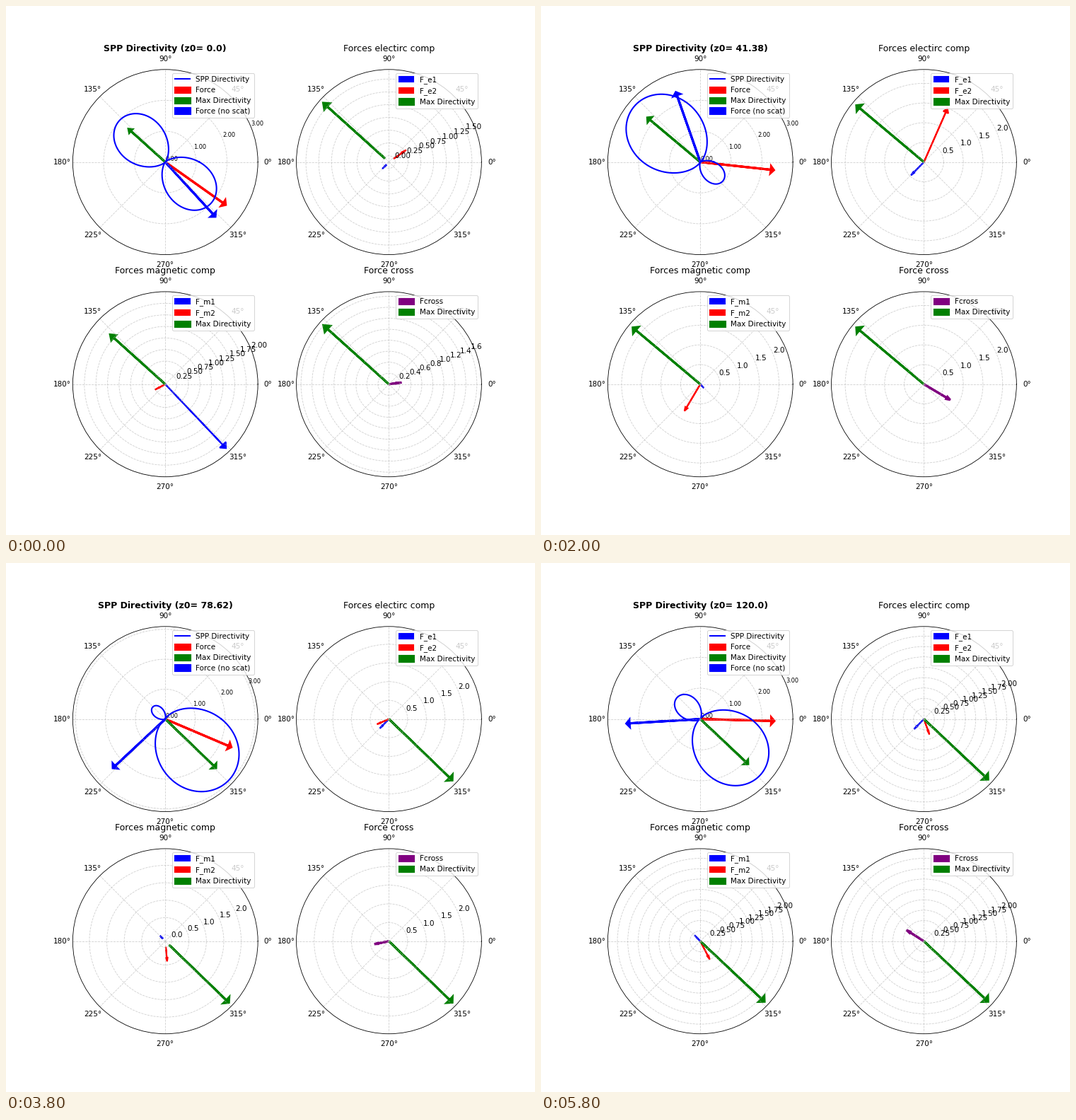
Write a matplotlib script that moves like this. It is 748 px wide and 748 px high and loops after 6000 ms.

```python
import numpy as np
import matplotlib.pyplot as plt
from matplotlib.animation import FuncAnimation

FRAMES, INTERVAL = 30, 200
Z0 = np.linspace(0, 120, FRAMES)
THETA = np.linspace(0, 2 * np.pi, 1441)
HEAD = 0.1
DIPOLE = np.radians(-41.9)


def sigmoid(z, centre, width):
    return 1 / (1 + np.exp((centre - z) / width))


def bump(z, centre, width):
    return np.exp(-((z - centre) / width) ** 2)


def mix(a, b, t):
    return a + (b - a) * t


def directivity(z):
    """Dipole plus isotropic scattering, normalised to a mean of one."""
    a = THETA - DIPOLE
    u = 2.6 - np.exp((57.4 - z) / 8.66) - 1j * (0.4 + 0.038 * max(0, z - 78))
    v = 0.095 + 0.09 * bump(z, 53.8, 12)
    field = 1 + u * np.cos(a) - v * np.sin(a)
    return abs(field) ** 2 / (1 + (abs(u) ** 2 + v ** 2) / 2)


def forces(z):
    """Length and angle in degrees of every force at height z."""
    flip = sigmoid(z, 43, 2.5)  # phase jump at the resonance
    near = 1.05 * bump(z, 28, 15)
    ripple = 15 * np.cos(2 * np.pi * (z - 80) / 60)
    return {
        "force": (2.4, 3 - 38.3 * np.exp(-z / 12.8)
                  - flip * (27.2 - 0.0078 * (z - 66) ** 2)),
        "no_scat": (2.4, mix(-47.5 + 0.00132 * z ** 3,
                             231 - 0.0097 * (z - 50) ** 2, flip)),
        "e1": (0.06 + 0.28 * sigmoid(z, 30, 3) + 0.22 * bump(z, 52, 15), 225.5),
        "e2": (0.25 + 0.0012 * z + 1.4 * bump(z, 34, 18),
               mix(35, 40 + 2.08 * z, flip)),
        "m1": (1.67 / (1 + (z / 7) ** 2) + 0.0037 * (64 - z), -46.5),
        "m2": (0.22 + 0.0023 * z + near, 208 + flip * (82 - ripple)),
        "cross": (0.2 + 0.0025 * z + near, 10 - 225 * sigmoid(z, 61, 13)),
    }


def polar(r, degrees):
    return abs(r), np.radians(degrees if r >= 0 else degrees + 180)


def arrow(ax, vec, color, label, lw):
    r, angle = vec
    ax.arrow(angle, 0, 0, max(r, 0.005), color=color, label=label, lw=lw,
             head_width=HEAD, head_length=HEAD, length_includes_head=True)


def finish(ax, title, lo, hi, **font):
    ax.set_xlim(0, 2 * np.pi)
    ax.set_ylim(lo, hi)
    ax.grid(True, linestyle="--", alpha=0.6)
    ax.set_title(title, **font)
    ax.legend(loc="upper right", labelspacing=0.47)


def arrow_panel(ax, title, *arrows):
    ax.clear()
    for item in arrows:
        arrow(ax, *item)
    lengths = [vec[0] for vec, *_ in arrows]
    # Heads longer than their arrow reach past the origin
    lo, hi = min(0, min(lengths) - HEAD), max(lengths)
    pad = 0.05 * (hi - lo)
    finish(ax, title, lo - pad if lo < 0 else 0, hi + pad)


fig, axes = plt.subplots(2, 2, figsize=(10, 10), dpi=74.8,
                         subplot_kw={"projection": "polar"})
ax_dir, ax_el, ax_mag, ax_cross = axes.flat


def draw(i):
    z = float(Z0[i])
    d = directivity(z)
    peak = d.argmax()
    f = {name: polar(*vec) for name, vec in forces(z).items()}
    green = ((0.8 * d[peak], THETA[peak]), "green", "Max Directivity", 3)

    ax_dir.clear()
    ax_dir.plot(THETA, d, color="blue", lw=2, label="SPP Directivity")
    arrow(ax_dir, f["force"], "red", "Force", 3)
    arrow(ax_dir, *green)
    arrow(ax_dir, f["no_scat"], "blue", "Force (no scat)", 3)
    ticks = range(4)
    ax_dir.set_yticks(ticks, [f"{t:.2f}" for t in ticks], fontsize=8)
    finish(ax_dir, f"SPP Directivity (z0= {round(z, 2)})",
           0, max(3, 1.05 * d[peak]), fontweight="bold")

    arrow_panel(ax_el, "Forces electirc comp", (f["e1"], "blue", "F_e1", 2),
                (f["e2"], "red", "F_e2", 2), green)
    arrow_panel(ax_mag, "Forces magnetic comp", (f["m1"], "blue", "F_m1", 2),
                (f["m2"], "red", "F_m2", 2), green)
    arrow_panel(ax_cross, "Force cross", (f["cross"], "purple", "Fcross", 3), green)
    return []


anim = FuncAnimation(fig, draw, frames=FRAMES, init_func=lambda: [],
                     interval=INTERVAL, repeat=True, repeat_delay=0)
plt.show()
```
